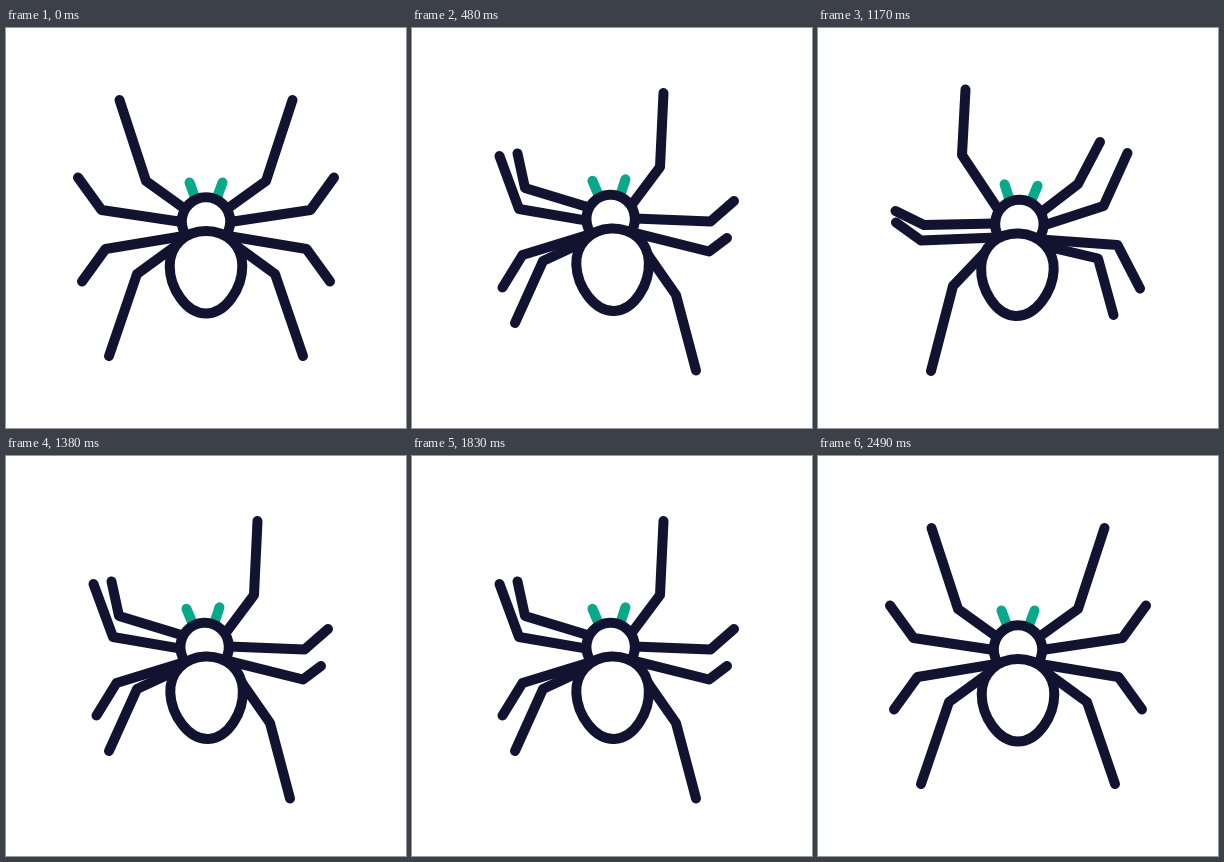
Recreate the animation shown at these times as an HTML page. Size 400 by 400 pixels, loop 2520 ms.

```html
<!DOCTYPE html>
<html lang="en">
<head>
<meta charset="utf-8">
<title>Walking spider</title>
<style>
html, body { margin: 0; width: 100%; height: 100%; overflow: hidden; background: #fff; }
svg { display: block; width: 100%; height: 100%; }
path, circle { fill: none; stroke: #121331; stroke-width: 10; stroke-linecap: round; stroke-linejoin: round; }
.fang { stroke: #08a88a; }
.body { fill: #fff; }
</style>
</head>
<body>
<svg viewBox="0 0 400 400">
  <g id="legs"></g>
  <g id="trunk">
    <path class="fang" d="M183.5 154.5L188.5 168M216.5 154.5L211.5 168"/>
    <circle class="body" cx="200" cy="193.5" r="24.2"/>
    <path class="body" d="M200 203C179 203 163.7 218 163.7 238C163.7 260 180 285.5 200 285.5C220 285.5 236.3 260 236.3 238C236.3 218 221 203 200 203Z"/>
  </g>
</svg>
<script>
const STEP = 30, STEPS = 84, LEAN = 2.5;
const hips = [[179, 181], [176, 194], [178, 208], [175, 214]];

// Knee x, y and tip x, y: four left legs, then four right legs, front to back.
const restLeft = [[140, 153, 113.5, 72], [95.5, 182, 72, 149.5], [99.5, 221, 76, 253.5], [131, 246, 103, 328]];
const rest = {
  lean: 0,
  legs: restLeft.concat(restLeft.map(([a, b, c, d]) => [400 - a, b, 400 - c, d]))
};
const right = {
  lean: 1,
  legs: [
    [144, 127, 147.5, 61.5], [106, 197, 77.5, 183], [103, 212.5, 78, 194.5], [135, 258, 113, 343],
    [260, 156, 282, 114], [285.5, 178, 309.5, 125], [299.5, 217, 322, 260.5], [280, 230.5, 295.5, 287]
  ]
};
const left = {
  lean: -1,
  legs: [
    [113, 160, 105.5, 125.5], [107, 181, 87.5, 128], [110.5, 227, 90.5, 259.5], [131, 233, 103, 295],
    [248, 139, 251.5, 65], [298.5, 193.5, 322, 173], [297, 223.5, 315, 210], [264, 267, 284, 342.5]
  ]
};

const keys = [[0, rest]];
for (let n = 9; n < 70; n += 15) keys.push([n, right], [n + 7, left]);
keys.push([83, rest], [84, rest]);

const group = document.getElementById("legs");
const trunk = document.getElementById("trunk");
const paths = rest.legs.map(() =>
  group.appendChild(document.createElementNS("http://www.w3.org/2000/svg", "path")));

const mix = (a, b, u) => a + (b - a) * u;

function place([x, y], lean) {
  const a = lean * LEAN * Math.PI / 180, dx = x - 200, dy = y - 225;
  return [
    200 + dx * Math.cos(a) - dy * Math.sin(a),
    225 + LEAN * lean + dx * Math.sin(a) + dy * Math.cos(a)
  ];
}

// Swings a joint around its hip, from one pose to the next.
function swing(side, hipA, a, hipB, b, hip, u) {
  const polar = (h, p) => {
    const dx = (p[0] - h[0]) * side, dy = p[1] - h[1];
    return [Math.hypot(dx, dy), Math.atan2(dy, dx)];
  };
  const [ra, ta] = polar(hipA, a), [rb, tb] = polar(hipB, b);
  const r = mix(ra, rb, u), t = mix(ta, tb, u);
  return [hip[0] + side * r * Math.cos(t), hip[1] + r * Math.sin(t)];
}

function draw(n) {
  let k = 0;
  while (k < keys.length - 2 && n >= keys[k + 1][0]) k++;
  const [n0, from] = keys[k], [n1, to] = keys[k + 1];
  const v = (n - n0) / (n1 - n0);
  const u = (1 - Math.cos(Math.PI * v)) / 2;
  const lean = mix(from.lean, to.lean, u);
  trunk.setAttribute("transform", `translate(0 ${LEAN * lean}) rotate(${LEAN * lean} 200 225)`);

  // The leading front leg stretches a little as it starts back.
  const reach = from === rest || to === rest ? 0 : 14 * Math.sin(Math.PI * Math.min(1, v * 1.6));
  const leader = from === right ? 0 : 4;

  paths.forEach((path, i) => {
    const side = i < 4 ? -1 : 1;
    const [hx, hy] = hips[i % 4];
    const base = [side < 0 ? hx : 400 - hx, hy];
    const hipA = place(base, from.lean), hipB = place(base, to.lean), hip = place(base, lean);
    const a = from.legs[i], b = to.legs[i];
    const joint = j => swing(side, hipA, a.slice(j, j + 2), hipB, b.slice(j, j + 2), hip, u);
    const knee = joint(0), tip = joint(2);
    if (i === leader) {
      knee[1] -= reach / 2;
      tip[1] -= reach;
    }
    path.setAttribute("d", "M" + [hip, knee, tip].map(p => p.map(c => c.toFixed(2)).join(" ")).join("L"));
  });
}

function tick() {
  draw(Math.floor(performance.now() / STEP) % STEPS);
  requestAnimationFrame(tick);
}
tick();
</script>
</body>
</html>
```
